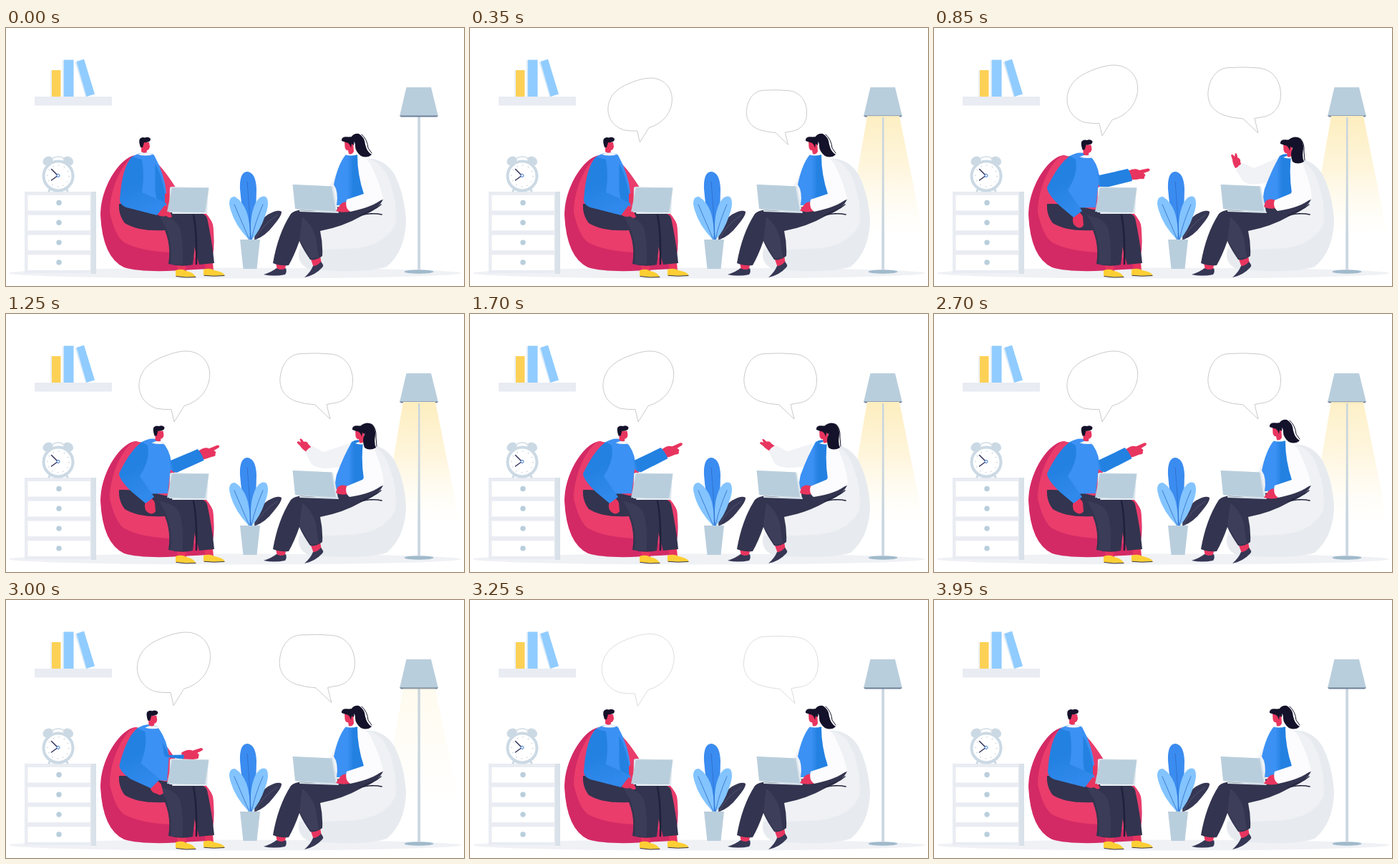
An HTML page for the animation above (4 s loop, 640 px wide and 361 px high).

```html
<!DOCTYPE html>
<html lang="en">
<head>
<meta charset="utf-8">
<title>Two people chatting</title>
<style>
  html, body { margin: 0; width: 100%; height: 100%; overflow: hidden; background: #fff; }
  svg { display: block; width: 100vw; height: 100vh; }
  .bubble { fill: #fff; stroke: #c9cacc; stroke-width: 1; stroke-linejoin: round; vector-effect: non-scaling-stroke; }
  .line { fill: none; stroke-linecap: round; }
  .steel { fill: #b9cedc; }
  .pale { fill: #e9ecf2; }
  .navy { fill: #33344f; }
  .skin { fill: #e8355f; }
  .ink { fill: #14122a; }
</style>
</head>
<body>
<svg viewBox="0 0 640 361" preserveAspectRatio="none">
  <defs>
    <linearGradient id="glow" x1="0" y1="0" x2="0" y2="1">
      <stop offset="0" stop-color="#fdeebf"/>
      <stop offset=".45" stop-color="#fef4d8" stop-opacity=".9"/>
      <stop offset="1" stop-color="#fffaec" stop-opacity="0"/>
    </linearGradient>
    <linearGradient id="vest">
      <stop offset=".45" stop-color="#3c91f4"/>
      <stop offset=".65" stop-color="#2381e2"/>
    </linearGradient>
    <linearGradient id="forearm">
      <stop offset=".15" stop-color="#3c91f4"/>
      <stop offset=".22" stop-color="#2381e2"/>
    </linearGradient>
    <linearGradient id="sleeve" x1="0" y1="0" x2=".3" y2="1">
      <stop offset=".5" stop-color="#2381e2"/>
      <stop offset="1" stop-color="#3089ec"/>
    </linearGradient>
  </defs>

  <ellipse cx="320" cy="343" rx="316" ry="7.5" fill="#eff1f5"/>

  <!-- shelf and books -->
  <rect class="pale" x="40" y="96" width="108" height="12.5"/>
  <rect x="62" y="59" width="3" height="37" fill="#edf0f4"/>
  <rect x="64" y="59" width="12.5" height="37" fill="#fdd156"/>
  <rect x="79" y="45" width="3" height="51" fill="#dcebf8"/>
  <rect x="81" y="44.5" width="13.5" height="51.5" fill="#90ccff"/>
  <path d="M96.500 48 L99 47 L114 95.500 L111 96Z" fill="#dcebf8"/>
  <path d="M98.500 47 L109 43.500 L124 92.500 L112.500 96Z" fill="#90ccff"/>

  <!-- drawers and clock -->
  <rect class="pale" x="26" y="229" width="94" height="114"/>
  <rect x="119" y="229" width="7" height="115" fill="#d9e1e9"/>
  <g id="drawers" fill="#fff"></g>
  <path class="line" d="M62 225 L60 228 M84 225 L86 228" stroke="#cbd9e4" stroke-width="3"/>
  <path class="line" d="M62 185 Q73 175 84 185" stroke="#dbe4eb" stroke-width="2"/>
  <ellipse cx="58.500" cy="186" rx="7.500" ry="6" fill="#cbd9e4" transform="rotate(-35 58.500 186)"/>
  <ellipse cx="87" cy="186" rx="7.500" ry="6" fill="#cbd9e4" transform="rotate(35 87 186)"/>
  <circle cx="73" cy="207" r="20.500" fill="#fff" stroke="#cbd9e4" stroke-width="4"/>
  <circle cx="73" cy="207" r="15" fill="none" stroke="#b5c6d4" stroke-width="1.500" stroke-dasharray="1 6.854"/>
  <path class="line" d="M72.500 206.500 L63.500 197.500 M72.500 206.500 L63.500 213" stroke="#33345c" stroke-width="1.500"/>
  <circle cx="73" cy="206.500" r="2" fill="#fff" stroke="#3c78d0"/>

  <!-- lamp -->
  <rect x="575.300" y="124" width="3.500" height="217" fill="#c9d5df"/>
  <ellipse cx="577" cy="341" rx="20.500" ry="2.800" fill="#a0bacb"/>
  <path class="steel" d="M559.500 83 H594 L604 123.500 H550Z"/>
  <path d="M550 122.500 H604 L602 124.500 H552Z" fill="#6e8098"/>
  <path id="light" d="M555 123 H600 L634 292 H526Z" fill="url(#glow)"/>
  <rect x="576" y="125" width="2.500" height="214" fill="#c9d5df"/>

  <!-- bean bags -->
  <path d="M181 178 C160 180 132 222 132 262 Q135 321 165 335 Q185 341 225 340 L283 337 Q294 315 289 275 Q282 255 238 225 Q216 190 203 183Z" fill="#d32a65"/>
  <path d="M181 178 C166 182 145 222 145 258 Q152 290 165 300 Q190 313 232 314 L280 325 Q293 310 289 275 Q282 255 238 225 Q216 190 203 183Z" fill="#ea3d6c"/>
  <path d="M500 183 Q527 180 543 205 Q558 235 559 272 Q557 313 532 334 Q510 341 465 340 L425 338 Q405 330 410 309 Q430 270 475 215Z" fill="#e7ebef"/>
  <path d="M500 183 Q520 183 532 205 Q548 240 544 275 Q530 303 490 308 Q445 311 410 310 Q430 270 475 215Z" fill="#eff1f4"/>

  <!-- plant -->
  <path d="M347 297 Q347 274 366 261 Q380 253 385 257 Q386 262 374 276 Q363 291 347 297Z" fill="#363754"/>
  <path d="M341 297 Q329 258 327 225 Q326 202 337 201 Q349 202 350 225 Q350 260 343 297Z" fill="#3b8cf0"/>
  <path d="M340 297 Q316 272 312 246 Q312 235 320 236 Q333 244 338 263 Q342 280 340 297Z" fill="#83c4ff"/>
  <path d="M343 297 Q339 265 349 244 Q357 232 364 237 Q369 245 362 263 Q355 284 343 297Z" fill="#83c4ff"/>
  <path class="line" d="M337 215 Q341 260 342 296 M319 247 L340 296 M359 247 Q348 272 343 296" stroke="#2c6cc8" stroke-width=".8"/>
  <path class="line" d="M379 262 Q358 275 348 296" stroke="#5b5d7c" stroke-width=".7"/>
  <path class="steel" d="M327 296 H355 L350.500 337 H331.500Z"/>

  <!-- man -->
  <path class="skin" d="M238 328 H251 L252 341 H240Z M277 328 H289 L290 340 H279Z"/>
  <path d="M237 339 Q246 336 252 340 Q262 342 265 348 Q251 350 237 347Z M276 338 Q285 335 291 339 Q303 341 306 346 Q290 348 276 346Z" fill="#fdcf35"/>
  <path class="line" d="M238 347.500 Q251 350 265 348.500 M277 346.300 Q290 348 305 346.500" stroke="#3a3140"/>
  <path class="navy" d="M252 258 Q276 255 281 266 Q288 298 291 329 L270 331 Q262 300 252 270Z"/>
  <path class="navy" d="M158 246 Q190 245 222 254 Q255 255 262 263 Q266 300 261 331 Q245 335 227 330 Q231 305 222 283 Q185 285 166 273 Q157 262 158 246Z"/>
  <path d="M214 262 Q238 265 244 282 Q248 305 247 331 L230 331 Q233 305 224 280Z" fill="#3b3c58"/>
  <path class="line" d="M262 262 Q267 285 266 330" stroke="#20213a" stroke-width="2.500"/>
  <path id="manTorso" fill="#3c91f4"/>
  <g id="manReach">
    <path id="manPoint" class="skin" d="M-3 -6 Q7 -11 13 -7 L25 -9.500 Q30 -8 26 -5.500 L19 -3 Q23 0 20 2 Q21 6 15 5 Q6 7 -2 6Z"/>
    <path id="manArm" fill="url(#forearm)"/>
  </g>
  <path id="manHand" class="skin"/>
  <path id="manSleeve" fill="url(#sleeve)"/>
  <g id="manHead">
    <path d="M184 177 Q194 171 205 177 Q196 180 184 177Z" fill="#f4f5f9"/>
    <path class="skin" d="M189 160 H200 L201 166 Q200 171 197 171 L196.500 174 Q193 176 189 173Z"/>
    <path class="ink" d="M188 167 Q185 158 187 155 Q190 152 194 153.500 Q199 151.500 202 155 Q202 159 198 159.500 Q195 160.500 193 160 L191 167Z"/>
  </g>
  <path d="M229 223 L232 222 L283 223.500 L281 259 L228 258Z" fill="#dde7ee"/>
  <path class="steel" d="M232 223.500 L283.500 223.500 L278 258.500 L225 257Z"/>
  <path class="line" d="M233 259 H279" stroke="#e9eff4" stroke-width="2"/>

  <!-- woman -->
  <path class="skin" d="M377 328 L392 329 L389 340 L379 339Z M425 321 L439 319 L441 330 L430 335Z"/>
  <path d="M360 345 Q372 341 378 336 Q385 340 391 336 Q393 341 390 345 Q375 348 360 345Z M417 349 Q426 341 429 333 Q435 333 440 327 Q445 332 442 335 Q432 346 417 349Z" fill="#363754"/>
  <path class="navy" d="M527 240 Q519 255 497 263 Q471 278 439 284 Q443 302 442 319 Q433 326 425 324 Q414 308 410 298 Q403 318 395 332 Q383 333 373 329 Q380 288 398 260 Q404 253 425 254 L470 250 Q500 250 527 240Z"/>
  <path d="M414 264 Q428 275 433 293 L437 321 L426 323 Q417 308 410 296Z" fill="#3d3e5a"/>
  <path class="line" d="M495 262 Q512 258 525 261 M500 259 Q515 255 524 247" stroke="#25263f" stroke-width="1.600"/>
  <g id="womanReach">
    <path id="womanOpen" class="skin" d="M-5 4 Q-9 -3 -9 -8 L-11 -14 Q-9 -17 -6 -12 L-5 -17 Q-2 -17 -2 -11 Q3 -9 2 -5 L4 1Z"/>
    <path id="womanArm" fill="#f1f2f6"/>
  </g>
  <path id="womanVest" fill="url(#vest)"/>
  <path d="M402 219 L457 221.500 L464 257 L460 258 L406 254Z" fill="#dde7ee"/>
  <path class="steel" d="M400.500 219 L455 221.500 L461 256.500 L404 253Z"/>
  <path class="line" d="M411 256 L464 258" stroke="#d4e0e8" stroke-width="2"/>
  <path id="womanHand" class="skin"/>
  <path id="womanSleeve" fill="#fcfcfe"/>
  <g id="womanHead">
    <path d="M473 177 Q482 172 491 177 Q483 180 473 177Z" fill="#fff"/>
    <path class="skin" d="M473 157 L473.500 167 Q475 172 478 171 L479 176 Q483 178 486 173 L485 157Z"/>
    <path class="ink" d="M469 158 Q468 151 479 152.500 Q484 151 487 156 L486 164 L483 162 L482 168 Q480 160 475 160Z"/>
  </g>
  <path id="womanHair" class="ink"/>
  <path id="womanLock" class="line" stroke="#14122a" stroke-width="1"/>

  <path id="leftBubble" class="bubble" d="M231 133.500 Q219 134 210 132 C189 125 182 105 188 88 C193 72 208 64 224 58 C250 48 266 51 277 63 C288 76 287 96 275 112 Q265 124 249 128.500 L235 151Z"/>
  <path id="rightBubble" class="bubble" d="M432 127 Q417 126 405 122 C386 115 381 100 383.500 86 C386 68 397 56 412 55.500 Q434 54 454 56 C473 58 484 73 484.500 92 C485 110 475 121 462 124 L448 126.500 L453 147Z"/>
</svg>
<script>
const LOOP = 4000;
const $ = id => document.getElementById(id);
const move = (id, transform) => $(id).setAttribute('transform', transform);
const clamp = k => Math.min(1, Math.max(0, k));
const lerp = (a, b, k) => a + (b - a) * k;
const ramp = (t, from, to) => {
  const k = clamp((t - from) / (to - from));
  return k * k * (3 - 2 * k);
};
const hold = (t, start, full, fade, end) => ramp(t, start, full) - ramp(t, fade, end);
const overshoot = k => {
  const c = 1.4, u = clamp(k) - 1;
  return 1 + (c + 1) * u ** 3 + c * u ** 2;
};

// Each pair is [at the laptop, talking].
const manShapes = {
  manTorso: [
    'M178 179 Q194 170 207 178 Q222 205 224 232 L224 255 L164 247 Q158 205 178 179Z',
    'M188 180 Q204 170 217 178 Q229 189 231 208 L226 251 L185 252 Q172 214 188 180Z'],
  manSleeve: [
    'M176 180 Q162 195 159 240 Q159 249 172 252 L211 262 L224 245 L190 230 Q194 205 190 184Z',
    'M190 179 Q174 190 158 223 Q158 232 176 249 L195 265 L207 256 L187 227 Q202 204 198 184Z'],
  manHand: [
    'M212 248 Q221 245 227 252 L232 264 Q228 267 224 263 Q216 265 210 260Z',
    'M196 259 Q204 255 208 264 L209 276 Q205 282 199 278 Q193 275 194 266Z'],
  manArm: [
    'M207 188 Q216 200 222 230 L222 244 Q216 249 210 238 L206 214 Q204 200 207 188Z',
    'M220 190 Q228 200 231 206 L271 197 Q276 205 277 214 L237 224 Q226 224 220 190Z']
};
const womanShapes = {
  womanVest: [
    'M475 177 Q485 173 493 179 Q500 203 500 232 L494 247 L462 248 Q465 229 458 219 Q464 190 475 177Z',
    'M483 179 Q492 173 500 180 Q502 205 500 229 L492 243 L461 245 Q459 236 462 225 Q472 198 483 179Z'],
  womanHand: [
    'M480 244 Q470 242 466 249 L461 256 Q468 259 480 257Z',
    'M478 241 Q468 237 463 243 L461 250 Q467 254 478 252Z'],
  womanSleeve: [
    'M491 178 Q506 181 512 196 Q523 220 527 238 Q515 250 481 257 Q473 252 476 240 L500 232 Q491 205 491 178Z',
    'M499 179 Q514 182 518 198 Q527 220 528 237 Q515 251 480 256 Q473 250 476 241 L500 231 Q496 205 499 179Z'],
  womanArm: [
    'M474 184 Q464 196 460 207 L452 222 Q448 226 448 232 L458 240 Q464 238 474 214Z',
    'M482 181 Q462 190 447 196 L432 189 Q424 192 422 199 L431 213 Q440 224 474 214Z'],
  womanHair: [
    'M482 153 Q486 147 493 148 Q501 152 502 163 Q504 173 511 177 Q505 183 496 179 Q487 172 488 163 Q487 157 482 155Z',
    'M496 156 Q502 151 509 153 Q517 158 516 169 Q514 181 517 187 Q508 192 501 187 Q497 176 501 169 Q502 160 496 158Z'],
  womanLock: [
    'M497 149 Q505 156 506 168 L511 175',
    'M511 154 Q518 160 517 173 L518 185']
};

function blend([a, b], k) {
  const to = b.match(/-?[\d.]+/g);
  let i = 0;
  return a.replace(/-?[\d.]+/g, n => lerp(+n, +to[i++], k).toFixed(2));
}

function pose(shapes, k) {
  for (const id in shapes) $(id).setAttribute('d', blend(shapes[id], k));
}

// Grows and shrinks around the tail tip, drifting with its size.
function bubble(id, t, start, x, y, drift) {
  const size = overshoot(Math.min(t - start, 3565 - t) / 700);
  move(id, `translate(${x + drift * (size - 1)} ${y - 95 * (size - 1)}) scale(${size}) translate(${-x} ${-y})`);
  $(id).setAttribute('opacity', Math.min(ramp(t, start, start + 200), 1 - ramp(t, 3100, 3480)));
}

function draw(t) {
  const man = hold(t, 400, 820, 2760, 3260);
  const woman = hold(t, 400, 850, 2200, 2680);
  const gesture = ramp(t, 900, 1400);
  const tap = Math.sin(t / LOOP * Math.PI * 32) * .7;

  pose(manShapes, man);
  move('manHead', `translate(${man * 19.5} ${man * 3.5})`);
  move('manHand', `translate(0 ${tap * (1 - man)})`);
  move('manReach', `rotate(${-13 * gesture * man} 225 211)`);
  move('manPoint', `translate(${lerp(218, 274, man)} ${lerp(240, 206, man)})`);

  pose(womanShapes, woman);
  move('womanHead', `translate(${woman * 15} ${woman * 4})`);
  move('womanHand', `translate(0 ${tap * (woman - 1)})`);
  move('womanReach', `translate(${-5 * gesture * woman} 0) rotate(${6 * gesture * woman} 482 200)`);
  move('womanOpen', `translate(${lerp(452, 426, woman)} ${lerp(238, 192, woman)}) rotate(${-42 * gesture})`);

  bubble('leftBubble', t, 120, 235, 151, -25);
  bubble('rightBubble', t, 155, 453, 147, 50);
  $('light').setAttribute('opacity', hold(t, 80, 400, 2550, 3220));
}

$('drawers').innerHTML = [0, 1, 2, 3].map(i => {
  const y = 234 + i * 27.8;
  return `<rect x="30.5" y="${y}" width="87" height="21.500"/><circle class="steel" cx="74" cy="${y + 10.5}" r="3.700"/>`;
}).join('');

const start = performance.now();
function tick() {
  draw((performance.now() - start) % LOOP);
  requestAnimationFrame(tick);
}
tick();
</script>
</body>
</html>
```
